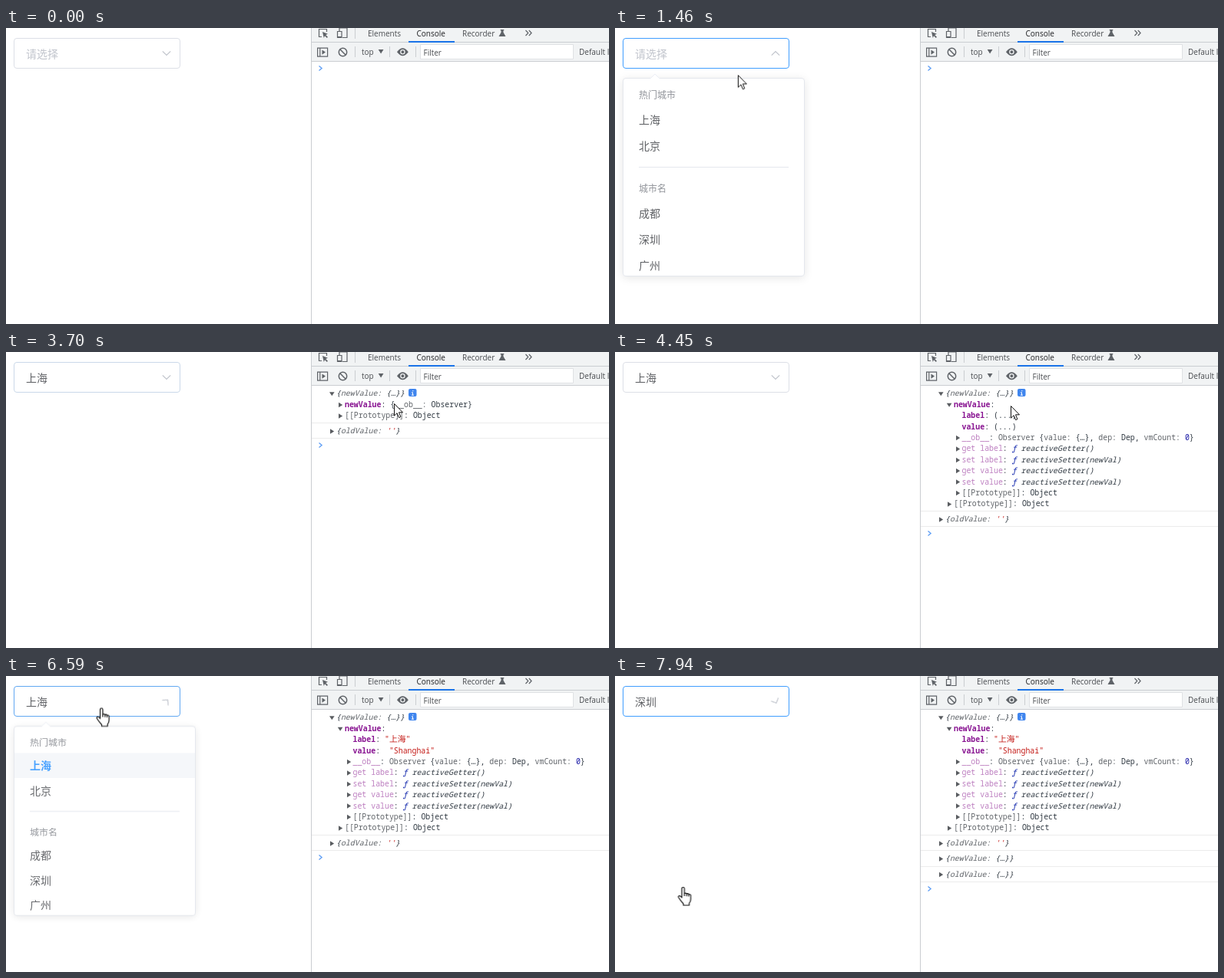
Animation, 785 px wide and 386 px high, one loop 8 s. Source, as an HTML page:

```html
<!DOCTYPE html>
<html lang="zh">
<head>
<meta charset="utf-8">
<title>Select and console</title>
<style>
html, body { margin: 0; width: 100%; height: 100%; overflow: hidden; background: #fff; }
#stage { position: relative; width: 785px; height: 386px; overflow: hidden; font: 14px "Noto Sans CJK SC", "Noto Sans CJK", sans-serif; color: #606266; }
#stage > svg { position: absolute; left: 0; top: 0; }
svg { overflow: visible; }

/* every animation shares the 8 s clock */
.a { animation: 8s linear infinite; }
.s { animation: 8s step-end infinite; }

/* select box */
#select { position: absolute; box-sizing: border-box; left: 10px; top: 13px; width: 217px; height: 40px; border: 1px solid #dcdfe6; border-radius: 4px; animation-name: border; }
#select span { position: absolute; left: 15px; line-height: 38px; }
#select .hint { color: #c0c4cc; animation-name: hint; }
#select .one { animation-name: one; }
#select .two { animation-name: last; }
#chevron { position: absolute; left: 191px; top: 12px; transform: rotate(180deg); animation-name: turn; animation-timing-function: ease; }

/* dropdown */
#drop { position: absolute; box-sizing: border-box; left: 10px; top: 65px; width: 237px; height: 259px; border: 1px solid #e4e7ed; border-radius: 4px; background: #fff; box-shadow: 0 2px 12px rgba(0,0,0,.1); transform-origin: center top; animation-name: drop; animation-timing-function: cubic-bezier(.23,1,.32,1); }
#drop > svg { position: absolute; left: 35px; top: -6px; }
#list { position: absolute; inset: 0; overflow: hidden; padding-top: 6px; border-radius: 3px; }
#list p { position: relative; margin: 0; padding-left: 20px; height: 34px; line-height: 34px; }
#list h6 { position: relative; margin: 0; padding-left: 20px; height: 30px; font: 12px/30px "Noto Sans CJK SC", "Noto Sans CJK", sans-serif; color: #909399; }
#list hr { margin: 11px 20px 12px; border: 0; height: 1px; background: #e4e7ed; }
#hover { position: absolute; left: 0; top: 36px; width: 100%; height: 34px; background: #f5f7fa; animation-name: hover; }
#bar { position: absolute; left: 227px; top: 2px; width: 6px; height: 243px; border-radius: 4px; background: #dddee0; animation-name: bar; }
.pick1 { animation-name: pick1; }
.pick2 { animation-name: pick2; }

/* developer tools */
.ui { font: 10px "Open Sans", "Noto Sans", sans-serif; fill: #4a4d51; }
.log { font: 9.9px "Noto Sans Mono", "DejaVu Sans Mono", monospace; fill: #303942; }
.log text { white-space: pre; }
.i { font-style: italic; }
.g { fill: #5f6368; }
.k { fill: #881391; font-weight: bold; }
.d { fill: #bd7fc0; }
.f { fill: #0d22aa; }
.r { fill: #c41a16; }
.n { fill: #1a1aa6; }
.cjk { font-size: 10.8px; }
.logged { animation-name: logged; }
.closed { animation-name: closed; }
.opened { animation-name: opened; }
.half { animation-name: half; }
.full { animation-name: full; }
.dots1 { animation-name: dots1; }
.val1 { animation-name: val1; }
.dots2 { animation-name: dots2; }
.val2 { animation-name: val2; }
.last { animation-name: last; }
.tail { animation-name: tail; }
.prompt { animation-name: prompt; }

/* pointer */
#pointer { animation-name: move; }
#arrow { animation-name: arrow; }
#hand { animation-name: hand; }

@keyframes border {
  0%, 9.75% { border-color: #dcdfe6; }
  12%, 13.1% { border-color: #c0c4cc; }
  15.5%, 44.4% { border-color: #409eff; }
  46.5%, 77.3% { border-color: #dcdfe6; }
  79.5%, 80.6% { border-color: #c0c4cc; }
  83%, 100% { border-color: #409eff; }
}
@keyframes turn {
  0%, 13.1% { transform: rotate(180deg); }
  16.9%, 25.8% { transform: rotate(0deg); }
  29.6%, 80.6% { transform: rotate(180deg); }
  84.4%, 96.75% { transform: rotate(0deg); }
  99.25% { transform: rotate(155deg); animation-timing-function: linear; }
  100% { transform: rotate(174deg); }
}
@keyframes drop {
  0%, 13.1% { opacity: 0; transform: scaleY(0); }
  16.9%, 25.8% { opacity: 1; transform: none; }
  29.6%, 80.6% { opacity: 0; transform: scaleY(0); }
  84.4%, 95.8% { opacity: 1; transform: none; }
  99.2%, 100% { opacity: 0; transform: scaleY(0); }
}
@keyframes bar {
  0%, 18.5% { opacity: 0; }
  22%, 33% { opacity: 1; }
  35%, 83.75% { opacity: 0; }
  87.5%, 100% { opacity: 1; }
}
@keyframes hover {
  0% { opacity: 0; }
  21% { opacity: 1; transform: translateY(0); }
  85.6% { transform: translateY(34px); }
  88.4% { transform: translateY(122px); }
  91.4%, 100% { transform: translateY(156px); }
}
@keyframes pick1 {
  25.8% { color: #409eff; font-weight: bold; }
  95.8% { color: #606266; font-weight: normal; }
}
@keyframes pick2 { 95.8%, 100% { color: #409eff; font-weight: bold; } }
@keyframes hint { 0% { opacity: 1; } 25.8%, 100% { opacity: 0; } }
@keyframes one { 0% { opacity: 0; } 25.8% { opacity: 1; } 95.8%, 100% { opacity: 0; } }
@keyframes last { 0% { opacity: 0; } 95.8%, 100% { opacity: 1; } }
@keyframes logged { 0% { opacity: 0; } 25.8%, 100% { opacity: 1; } }
@keyframes closed { 0% { opacity: 1; } 44.45%, 100% { opacity: 0; } }
@keyframes opened { 0% { opacity: 0; } 44.45%, 100% { opacity: 1; } }
@keyframes half { 0% { opacity: 0; } 44.45% { opacity: 1; } 49.6%, 100% { opacity: 0; } }
@keyframes full { 0% { opacity: 0; } 49.6%, 100% { opacity: 1; } }
@keyframes dots1 { 0% { opacity: 1; } 62.5%, 100% { opacity: 0; } }
@keyframes val1 { 0% { opacity: 0; } 62.5%, 100% { opacity: 1; } }
@keyframes dots2 { 0% { opacity: 1; } 66.25%, 100% { opacity: 0; } }
@keyframes val2 { 0% { opacity: 0; } 66.25%, 100% { opacity: 1; } }
@keyframes tail {
  0% { transform: translateY(0); }
  44.45% { transform: translateY(29px); }
  49.6%, 100% { transform: translateY(144px); }
}
@keyframes prompt {
  0% { transform: translateY(0); }
  25.8% { transform: translateY(41px); }
  44.45% { transform: translateY(69px); }
  49.6% { transform: translateY(184px); }
  95.8%, 100% { transform: translateY(225px); }
}
@keyframes move {
  0%, 2.5% { transform: translate(634px, 343px); animation-timing-function: ease-in-out; }
  11.25% { transform: translate(170px, 34px); }
  15% { transform: translate(166px, 36px); }
  18.25% { transform: translate(160px, 61px); }
  20.625% { transform: translate(135px, 100px); animation-timing-function: ease-out; }
  23.25%, 33.25% { transform: translate(120.5px, 115px); }
  35.875% { transform: translate(265px, 114px); }
  39.375% { transform: translate(540px, 75px); animation-timing-function: ease-out; }
  41.25% { transform: translate(567px, 62px); animation-timing-function: ease-in-out; }
  43.625% { transform: translate(500px, 56px); }
  46.25%, 49.625% { transform: translate(505px, 67px); }
  52.5% { transform: translate(517px, 55px); }
  55.625% { transform: translate(515px, 70px); }
  59% { transform: translate(512px, 67px); }
  61.875%, 62.5% { transform: translate(509px, 84px); }
  65%, 66.25% { transform: translate(510px, 98px); }
  69.25% { transform: translate(512px, 103px); }
  71% { transform: translate(519px, 114px); }
  72.5% { transform: translate(505px, 117px); }
  78.75% { transform: translate(150px, 34px); }
  80.625% { transform: translate(140px, 33px); }
  82.5% { transform: translate(122px, 42px); }
  83.75% { transform: translate(115px, 60px); }
  86.875% { transform: translate(95px, 190px); }
  89.125%, 90% { transform: translate(86px, 239px); }
  92.5%, 100% { transform: translate(87.5px, 275px); }
}
@keyframes arrow {
  0% { opacity: 0; }
  2.45% { opacity: 1; }
  9.8% { opacity: 0; }
  17.25% { opacity: 1; }
  21% { opacity: 0; }
  33.3% { opacity: 1; }
  77.4% { opacity: 0; }
  83.3% { opacity: 1; }
  84.75% { opacity: 0; }
  86.4% { opacity: 1; }
  88.4%, 100% { opacity: 0; }
}
@keyframes hand {
  0% { opacity: 0; }
  9.8% { opacity: 1; }
  17.25% { opacity: 0; }
  21% { opacity: 1; }
  33.3% { opacity: 0; }
  77.4% { opacity: 1; }
  83.3% { opacity: 0; }
  84.75% { opacity: 1; }
  86.4% { opacity: 0; }
  88.4%, 100% { opacity: 1; }
}
</style>
</head>
<body>
<div id="stage">
  <div id="select" class="a">
    <span class="hint s">请选择</span><span class="one s">上海</span><span class="two s">深圳</span>
    <svg id="chevron" class="a" width="14" height="14" fill="none" stroke="#c0c4cc" stroke-width="1.2"><path d="M1.8 9.7L7 4.5l5.2 5.2"/></svg>
  </div>

  <div id="drop" class="a">
    <svg width="12" height="7"><path d="M0 6L6 0l6 6" fill="#fff" stroke="#ebeef5"/><path d="M.7 5.5h10.6v1.5H.7z" fill="#fff"/></svg>
    <div id="list">
      <div id="hover" class="s"></div>
      <h6>热门城市</h6>
      <p class="pick1 s">上海</p>
      <p>北京</p>
      <hr>
      <h6>城市名</h6>
      <p>成都</p>
      <p class="pick2 s">深圳</p>
      <p>广州</p>
      <div id="bar" class="a"></div>
    </div>
  </div>

  <svg width="785" height="386">
    <defs>
      <path id="shut" d="M0-3.2L5.2 0 0 3.2z" fill="#5a5d61"/>
      <path id="open" d="M-.5-2.2h6.6L2.8 2.8z" fill="#5a5d61"/>
      <path id="rule" d="M398 0h387" stroke="#ececec"/>
    </defs>

    <!-- toolbars -->
    <path d="M398 0h387v43.5H398z" fill="#f1f3f4"/>
    <path d="M398 18.5h387M398 43.5h387M397.5 0v386" stroke="#cacdd1"/>
    <path d="M454.5 0v14M454.5 24v14M499.5 24v14M533.5 24v14" stroke="#cacdd1"/>
    <path d="M524 17h60v2h-60z" fill="#1a73e8"/>
    <path d="M539.5 21.5h199v19h-199z" fill="#fff" stroke="#dfe1e4"/>
    <g class="ui">
      <text x="471" y="10.7">Elements</text>
      <text x="534.5" y="10.7" fill="#202124">Console</text>
      <text x="594" y="10.7">Recorder</text>
      <text x="463" y="34.7">top</text>
      <text x="543.5" y="35.7">Filter</text>
      <text x="746" y="34.7">Default levels</text>
    </g>
    <g fill="none" stroke="#5f6368" stroke-width="1.2">
      <path d="M411 11.5h-3.5V1.5h10V5M434 4V0h10v12.5h-6"/>
      <path d="M431.5 4.5h5.5v8h-5.5zM431.5 11.5h5.5"/>
      <path d="M676.5 3l3.3 3.5-3.3 3.5M680.8 3l3.3 3.5-3.3 3.5"/>
      <path d="M405.6 26.1h13v11h-13zM408.8 26v11"/>
      <circle cx="438.5" cy="31.5" r="5.2" stroke-width="1.5"/>
      <path d="M434.8 27.8l7.4 7.4" stroke-width="1.5"/>
    </g>
    <g fill="#5f6368">
      <path d="M412 5l7 2.8-2.8 1.2 2.8 2.8-1.2 1.2-2.8-2.8-1.2 2.8z"/>
      <path d="M643.7 2h4.6v1.2h-.8v2.6l3 5.2h-9l3-5.2V3.2h-.8z"/>
      <path d="M411.5 28.5l4.5 3.1-4.5 3.1zM484.7 28h6.8l-3.4 5.5z"/>
      <path d="M509 31.2q7.4-10 14.8 0-7.4 10-14.8 0z"/>
    </g>
    <circle cx="516.4" cy="31.2" r="2.6" fill="#5f6368" stroke="#f1f3f4" stroke-width="1.3"/>

    <!-- console -->
    <g class="log">
      <g class="logged s">
        <use href="#shut" x="422" y="54.5" class="closed s"/>
        <text x="430" y="57" class="i">{<tspan class="g">newValue: </tspan>{…}}</text>
        <g class="tail s">
          <use href="#rule" y="63.5"/>
          <use href="#shut" x="422" y="74.5"/>
          <text x="430" y="77.2" class="i">{<tspan class="g">oldValue: </tspan><tspan class="r">''</tspan>}</text>
          <use href="#rule" y="83.5"/>
        </g>
      </g>

      <g class="opened s">
        <use href="#open" x="421.5" y="54.5"/>
        <rect x="524" y="48" width="10.5" height="10" rx="2" fill="#3f85ee"/>
        <path d="M529.8 50v1.3M528 52.8h1.4v3.4M527.8 56.2h3.2" fill="none" stroke="#fff"/>
      </g>

      <g class="half s">
        <use href="#shut" x="433" y="69"/>
        <text x="441" y="71.8"><tspan class="k">newValue</tspan>: {<tspan class="g">__ob__: </tspan>Observer}</text>
        <use href="#shut" x="433" y="83.5"/>
        <text x="441" y="86.2"><tspan class="g">[[Prototype]]</tspan>: Object</text>
      </g>

      <g class="full s">
        <use href="#open" x="432.3" y="69"/>
        <text x="441" y="71.8"><tspan class="k">newValue</tspan>:</text>
        <text x="451.5" y="86.2"><tspan class="k">label</tspan>:</text>
        <text x="493" y="86.2" class="dots1 s">(...)</text>
        <text x="493" y="86.2" class="r val1 s">"<tspan class="cjk">上海</tspan>"</text>
        <text x="451.5" y="100.6"><tspan class="k">value</tspan>:</text>
        <text x="493" y="100.6" class="dots2 s">(...)</text>
        <text x="493" y="100.6" class="r val2 s" style="font-kerning:none" dx="5.9">"Shanghai"</text>
        <use href="#shut" x="444" y="112"/>
        <text x="451.5" y="115"><tspan class="d">__ob__</tspan>: <tspan class="g">Observer </tspan>{<tspan class="g">value: </tspan>{…}, <tspan class="g">dep: </tspan>Dep, <tspan class="g">vmCount: </tspan><tspan class="n">0</tspan>}</text>
        <use href="#shut" x="444" y="126.5"/>
        <text x="451.5" y="129.4"><tspan class="d">get label</tspan>: <tspan class="i"><tspan class="f">ƒ</tspan> reactiveGetter()</tspan></text>
        <use href="#shut" x="444" y="141"/>
        <text x="451.5" y="143.8"><tspan class="d">set label</tspan>: <tspan class="i"><tspan class="f">ƒ</tspan> reactiveSetter(newVal)</tspan></text>
        <use href="#shut" x="444" y="155"/>
        <text x="451.5" y="158.2"><tspan class="d">get value</tspan>: <tspan class="i"><tspan class="f">ƒ</tspan> reactiveGetter()</tspan></text>
        <use href="#shut" x="444" y="169.5"/>
        <text x="451.5" y="172.6"><tspan class="d">set value</tspan>: <tspan class="i"><tspan class="f">ƒ</tspan> reactiveSetter(newVal)</tspan></text>
        <use href="#shut" x="444" y="184"/>
        <text x="451.5" y="187"><tspan class="g">[[Prototype]]</tspan>: Object</text>
        <use href="#shut" x="433" y="198.5"/>
        <text x="441" y="201.4"><tspan class="g">[[Prototype]]</tspan>: Object</text>
      </g>

      <g class="last s">
        <use href="#shut" x="422" y="238.5"/>
        <text x="430" y="241.4" class="i">{<tspan class="g">newValue: </tspan>{…}}</text>
        <use href="#rule" y="248.5"/>
        <use href="#shut" x="422" y="259"/>
        <text x="430" y="262" class="i">{<tspan class="g">oldValue: </tspan>{…}}</text>
        <use href="#rule" y="268.5"/>
      </g>
    </g>
    <g class="prompt s"><path d="M407.5 49.5l3.6 3-3.6 3" fill="none" stroke="#5b9cf5" stroke-width="1.3"/></g>

    <g id="pointer" class="a" fill="#fff" stroke="#111" stroke-linejoin="round">
      <path id="arrow" class="s" d="M.5.5v15.6l3.6-3.4 2.5 5.9 2.3-1-2.4-5.8h5z"/>
      <g id="hand" class="s" stroke-width="1.2">
        <path d="M-.5 14V2.2a1.7 1.7 0 0 1 3.4 0V8.5q1.6-.9 3 .4 1.6-.6 2.6.6 2.6-.2 2.6 2V16q0 3-2 5.4V24H1.5V22Q-3 17-4.8 13.8-5.4 12-3.8 11.6q1.6-.2 3.3 2.4z"/>
        <path d="M2.9 8.5V12M5.9 9v3.2M8.5 9.6v3" fill="none"/>
      </g>
    </g>
  </svg>
</div>
</body>
</html>
```
